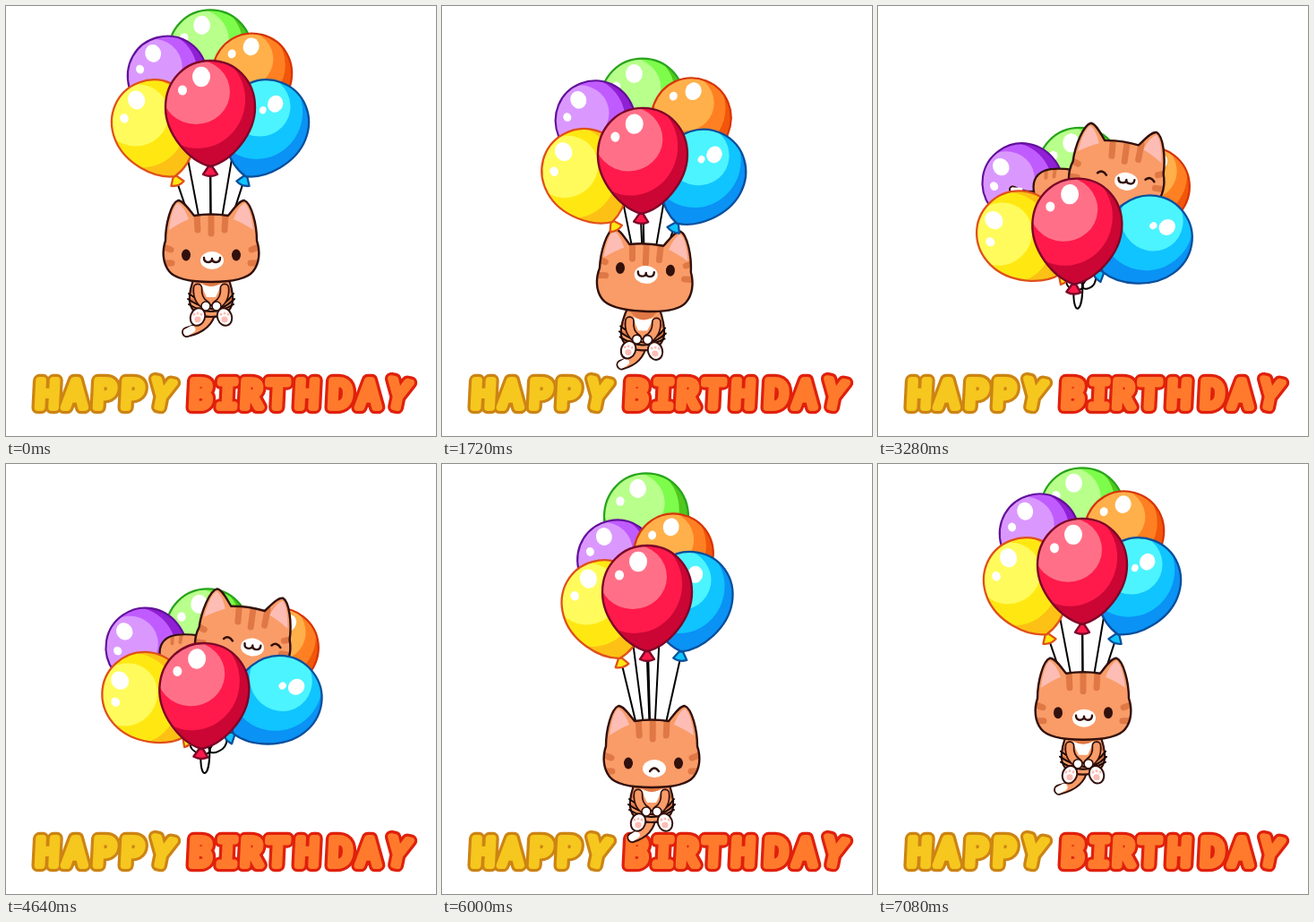
An HTML page with a canvas that plays this animation: 480x480 px, repeating every 7120 ms.

```html
<!DOCTYPE html>
<html lang="en">
<head>
<meta charset="utf-8">
<title>Happy Birthday</title>
<style>
html, body { margin: 0; width: 100%; height: 100%; overflow: hidden; background: #fff; }
canvas { display: block; width: 480px; height: 480px; }
</style>
</head>
<body>
<canvas id="stage" width="480" height="480" role="img" aria-label="HAPPY BIRTHDAY"></canvas>
<script>
const ctx = document.getElementById('stage').getContext('2d');
const LOOP = 7120, STEP = 40, TAU = Math.PI * 2;
const rad = d => d * Math.PI / 180;
const clamp = v => Math.max(0, Math.min(1, v));
const mix = (a, b, k) => a + (b - a) * k;
const INK = '#32100c', FUR = '#f99c68', STRIPE = '#df7845', PINK = '#fdbdb4';

// Smooth interpolation through rows [time, ...values] that never overshoots a key
function track(rows) {
  const slope = (i, c) => (rows[i + 1][c] - rows[i][c]) / (rows[i + 1][0] - rows[i][0]);
  const tangent = (i, c) => {
    if (i === 0 || i === rows.length - 1) return 0;
    const a = slope(i - 1, c), b = slope(i, c);
    return a * b <= 0 ? 0 : 2 * a * b / (a + b);
  };
  return t => {
    let i = 0;
    while (i < rows.length - 2 && rows[i + 1][0] <= t) i++;
    const p = rows[i], q = rows[i + 1], h = q[0] - p[0], s = (t - p[0]) / h;
    return p.slice(1).map((v, n) => {
      const c = n + 1, s2 = s * s, s3 = s2 * s;
      return v * (2 * s3 - 3 * s2 + 1) + q[c] * (3 * s2 - 2 * s3)
        + h * (tangent(i, c) * (s3 - 2 * s2 + s) + tangent(i + 1, c) * (s3 - s2));
    });
  };
}

// Poses of the bunch, each balloon as x, y, tilt
const balloons = {
  green: { size: .94, colors: ['#50c81e', '#7dfc4b', '#b8ff8c', '#28a41c'],
    hang: [228, 59, 0], peek: [222, 186, 0], high: [225, 190, 0], low: [225, 194, 0], lift: [228, 65, 0] },
  purple: { size: .89, colors: ['#9020d4', '#c05cff', '#da98ff', '#62109a'],
    hang: [182, 85, -15], peek: [164, 194, -35], high: [165, 203, -35], low: [160, 211, -35], lift: [197, 114, -12] },
  orange: { size: .89, colors: ['#f2560a', '#ff8022', '#ffb04a', '#d63408'],
    hang: [273, 82, 15], peek: [287, 191, 35], high: [299, 207, 38], low: [300, 211, 38], lift: [257, 107, 12] },
  yellow: { size: .95, colors: ['#fcc114', '#ffe812', '#fffb5c', '#e0501a'],
    hang: [168, 137, -21], peek: [158, 264, -45], high: [163, 259, -45], low: [160, 263, -43], lift: [183, 162, -16] },
  blue: { size: .95, colors: ['#0a92f5', '#10c4ff', '#4cf4ff', '#0a4f9c'], spots: [[2, -32, 9], [-9, -20, 4]],
    hang: [288, 137, 21], peek: [295, 267, 40], high: [297, 263, 54], low: [299, 266, 52], lift: [276, 153, 9] },
  red: { size: 1, colors: ['#cb0634', '#ff1a4b', '#ff7088', '#7c0628'],
    hang: [228, 119, 0], peek: [222, 241, 4], high: [222, 250, 3], low: [221, 258, 3], lift: [229, 149, 0] }
};
// time, pose, shift x, shift y
const bunch = [
  [0, 'hang', 0, 0], [720, 'hang', -1, 12], [1080, 'hang', -2.5, 28], [1440, 'hang', -3, 36],
  [2160, 'peek', 0, -23], [2280, 'peek', 0, 0], [2560, 'peek', 0, 8], [2880, 'high', 0, 3],
  [3440, 'high', 0, 0], [3840, 'low', 0, 0], [4240, 'high', 0, 0], [4640, 'low', 0, 0],
  [5040, 'high', 0, 0], [5400, 'high', 0, 4], [5760, 'peek', 0, -17], [6000, 'lift', 0, 0],
  [6060, 'lift', 0, -4], [6400, 'hang', 2, 20], [6760, 'hang', 0, -5], [LOOP, 'hang', 0, 0]
];
for (const b of Object.values(balloons)) {
  b.at = track(bunch.map(([t, pose, dx, dy]) => [t, b[pose][0] + dx, b[pose][1] + dy, b[pose][2]]));
}

// time, head x, y, tilt, face x, y, body angle, body drop
const bob = [3400, 3840, 4240, 4640, 5040].map((t, i) =>
  i % 2 ? [t, 265, 197, 8, 10, 0, 76, 18] : [t, 267, 188, 8, 10, 0, 76, 18]);
const catAt = track([
  [0, 229, 270, 0, 0, 8, 0, 0],
  [1080, 222, 304, -1, 0, -6, 0, 0],
  [1440, 222, 312, -2, 0, -9, 0, 0],
  [1900, 232, 290, 8, 0, -9, 5, 10],
  [2160, 246, 225, 18, -1, -10, 9, 22],
  [2280, 250, 202, 20, -2, -11, 9, 31],
  [2560, 262, 176, 14, 4, -5, 45, 25],
  [2880, 267, 191, 8, 10, -1, 76, 18],
  ...bob,
  [5420, 262, 174, 4, 5, 2, 60, 18],
  [5760, 248, 225, 5, 2, 6, 15, 8],
  [6000, 234, 323, 0, 2, 11, 0, 0],
  [6080, 234, 330, 0, 2, 11, 0, 0],
  [6400, 231, 298, 0, 1, 10, 0, 0],
  [6760, 229, 261, 0, 0, 8, 0, 0],
  [LOOP, 229, 270, 0, 0, 8, 0, 0]
]);

function oval(x, y, rx, ry, fill, line, a = 0) {
  ctx.beginPath();
  ctx.ellipse(x, y, rx, ry, a, 0, TAU);
  if (fill) { ctx.fillStyle = fill; ctx.fill(); }
  if (line) { ctx.strokeStyle = INK; ctx.lineWidth = line; ctx.stroke(); }
}

function line(d, color, width) {
  ctx.strokeStyle = color;
  ctx.lineWidth = width;
  ctx.stroke(new Path2D(d));
}

function placed(x, y, deg, size, draw) {
  ctx.save();
  ctx.translate(x, y);
  ctx.rotate(rad(deg));
  ctx.scale(size, size);
  draw();
  ctx.restore();
}

const skin = new Path2D('M0 60C-24 54-50 24-50-6C-50-36-28-58 0-58S50-36 50-6C50 24 24 54 0 60Z');
const knot = new Path2D('M-2 60L-8 69Q0 73 8 69L2 60Z');
const spots = [[-10, -40, 10], [-31, -25, 5]];

function drawBalloon(b, t) {
  const [x, y, tilt] = b.at(t), [dark, base, light, edge] = b.colors;
  placed(x, y, tilt, b.size, () => {
    ctx.lineWidth = 2.4;
    ctx.strokeStyle = edge;
    ctx.fillStyle = base;
    ctx.fill(knot);
    ctx.stroke(knot);
    ctx.save();
    ctx.clip(skin);
    ctx.fillStyle = dark;
    ctx.fillRect(-60, -60, 120, 125);
    oval(-13, -14, 52, 54, base, 0, .2);
    oval(-16, -23, 38, 36, light);
    for (const [sx, sy, r] of b.spots || spots) oval(sx, sy, r, r * 1.12, '#fff');
    ctx.restore();
    ctx.strokeStyle = edge;
    ctx.stroke(skin);
  });
}

function drawStrings(t, cat) {
  const chestX = cat[0], chestY = cat[1] + 38;
  const end = b => {
    const [x, y, a] = b.at(t), d = 70 * b.size;
    return [x - d * Math.sin(rad(a)), y + d * Math.cos(rad(a))];
  };
  const [rx, ry] = end(balloons.red);
  const slack = clamp((ry - chestY + 40) / 80);
  for (const b of Object.values(balloons)) {
    const [x, y] = end(b);
    const ex = mix(chestX, rx + 10, slack), ey = mix(chestY, ry - 8, slack);
    const sag = slack * (b === balloons.red ? 28 : 10);
    ctx.beginPath();
    ctx.moveTo(x, y);
    ctx.bezierCurveTo(mix(x, ex, .33 * (1 - slack)), mix(y, ey, .33) + sag,
      mix(x, ex, .67 + .33 * slack), mix(y, ey, .67) + sag, ex, ey);
    ctx.strokeStyle = '#000';
    ctx.lineWidth = 2;
    ctx.stroke();
  }
}

function drawBody(t, lying, drop) {
  ctx.translate(0, drop);
  const wag = lying ? -6 + 20 * Math.cos(TAU * (t - 4640) / 800)
    : -20 - 7 * Math.cos(TAU * t / LOOP * 5);
  const tipY = lying ? 99 : 94;
  const tail = `M0 70Q${wag * .1} 88 ${wag} ${tipY}`;
  line(tail, INK, lying ? 9 : 12);
  line(tail, FUR, lying ? 5 : 8);
  line(`M${wag * .8} 91L${wag} ${tipY}`, '#fff', lying ? 5 : 8);

  const torso = new Path2D('M-17 28C-22 40-25 50-24 60C-22 72-13 77 0 77S22 72 24 60C25 50 22 40 17 28Z');
  ctx.fillStyle = FUR;
  ctx.fill(torso);
  line('M-22 48L-15 51M22 48L15 51M-23 58L-16 60M23 58L16 60', STRIPE, 4);
  ctx.strokeStyle = INK;
  ctx.lineWidth = 2.2;
  ctx.stroke(torso);
  if (lying) return;

  ctx.fillStyle = '#fff';
  ctx.fill(new Path2D('M-12 40Q0 45 12 40L5 55H-5Z'));
  ctx.fillStyle = STRIPE;
  ctx.fill(new Path2D('M-15 34H15Q8 43 0 43T-15 34Z'));
  line('M-25 51Q-13 60 0 64T25 51M-26 57Q-13 66 0 68T26 57M-25 63Q-12 71 0 71T25 63', '#160806', 2);
  for (const s of [-1, 1]) {
    line(`M${s * 15} 45Q${s * 16} 58 ${s * 6} 64`, INK, 11);
    line(`M${s * 15} 45Q${s * 16} 58 ${s * 6} 64`, FUR, 7.5);
    oval(s * 6, 65, 5, 5, '#fff', 1.6);
    oval(s * 15, 77, 8, 10, '#fff', 2, s * -.35);
    oval(s * 15, 80, 3.6, 3.4, PINK);
    for (const d of [-4, 0, 4]) oval(s * 15 + d, 73 + Math.abs(d) * .3, 1.4, 1.6, PINK);
  }
}

const headShape = new Path2D('M-51-8C-51-26-45-50-37-53C-31-53-24-42-19-36Q0-39 19-36' +
  'C24-42 31-53 37-53C45-50 51-26 51-8C55 4 54 17 47 26C40 35 22 38 0 38S-40 35-47 26C-54 17-55 4-51-8Z');

function drawHead(t, fx, fy) {
  ctx.fillStyle = FUR;
  ctx.fill(headShape);
  ctx.save();
  ctx.clip(headShape);
  ctx.fillStyle = PINK;
  for (const s of [-1, 1]) {
    ctx.fill(new Path2D(`M${s * 47}-20Q${s * 44}-45 ${s * 37}-50Q${s * 30}-46 ${s * 25}-32Q${s * 35}-28 ${s * 47}-20Z`));
  }
  const x = fx * .6;
  line(`M${x - 16}-38L${x - 15}-20M${x}-38V-16M${x + 16}-38L${x + 15}-20`, STRIPE, 7);
  for (const s of [-1, 1]) {
    line(`M${s * 56} ${fy - 10}L${s * 45} ${fy - 6}M${s * 56} ${fy + 9}L${s * 44} ${fy + 9}`, STRIPE, 7);
  }
  ctx.restore();
  ctx.strokeStyle = INK;
  ctx.lineWidth = 2.4;
  ctx.stroke(headShape);

  ctx.translate(fx, fy);
  const asleep = t > 2800 && t < 5080, sad = t > 5640 && t < 6320;
  for (const s of [-1, 1]) {
    if (asleep) line(`M${s * 27 - 5} 1Q${s * 27} -4 ${s * 27 + 5} 2`, INK, 2.6);
    else oval(s * 28, 0, 5, 6.5, INK);
  }
  oval(1, 6, 13, 10, '#fff');
  line(sad ? 'M-4 9Q1 2 6 9' : 'M-8 3Q-8 8-3.5 8Q1 8 1 4Q1 8 5.5 8Q10 8 10 3', INK, 2.4);
}

function drawCat(t, [x, y, tilt, fx, fy, bodyAngle, drop]) {
  placed(x, y, bodyAngle, 1, () => drawBody(t, bodyAngle > 40, drop));
  placed(x, y, tilt, 1, () => drawHead(t, fx, fy));
}

function drawWord(word, centers, fill, edge) {
  ctx.font = '42px "Noto Sans Mono", "DejaVu Sans Mono", monospace';
  ctx.textAlign = 'center';
  ctx.textBaseline = 'alphabetic';
  for (const [color, width] of [[edge, 14.5], [fill, 8]]) {
    ctx.strokeStyle = ctx.fillStyle = color;
    ctx.lineWidth = width;
    [...word].forEach((letter, i) => {
      ctx.save();
      ctx.translate(centers[i], 433);
      if (letter === 'Y') ctx.rotate(.2);
      else ctx.transform(1, 0, -.05, 1, 0, 0);
      ctx.strokeText(letter, 0, 15);
      ctx.fillText(letter, 0, 15);
      ctx.restore();
    });
  }
}

function draw(t) {
  ctx.fillStyle = '#fff';
  ctx.fillRect(0, 0, 480, 480);
  ctx.lineCap = ctx.lineJoin = 'round';
  drawWord('HAPPY', [46, 77, 110, 141, 174], '#f6c71e', '#cc8414');
  drawWord('BIRTHDAY', [217, 247, 274, 303, 336, 373, 405, 438], '#ff7a2c', '#e0200c');
  const cat = catAt(t), { green, purple, orange, yellow, blue, red } = balloons;
  drawStrings(t, cat);
  for (const b of [green, purple, orange]) drawBalloon(b, t);
  drawCat(t, cat);
  for (const b of [yellow, blue, red]) drawBalloon(b, t);
}

const start = performance.now();
function frame() {
  const t = (performance.now() - start) % LOOP;
  draw(Math.floor(t / STEP) * STEP);
  requestAnimationFrame(frame);
}
frame();
</script>
</body>
</html>
```
